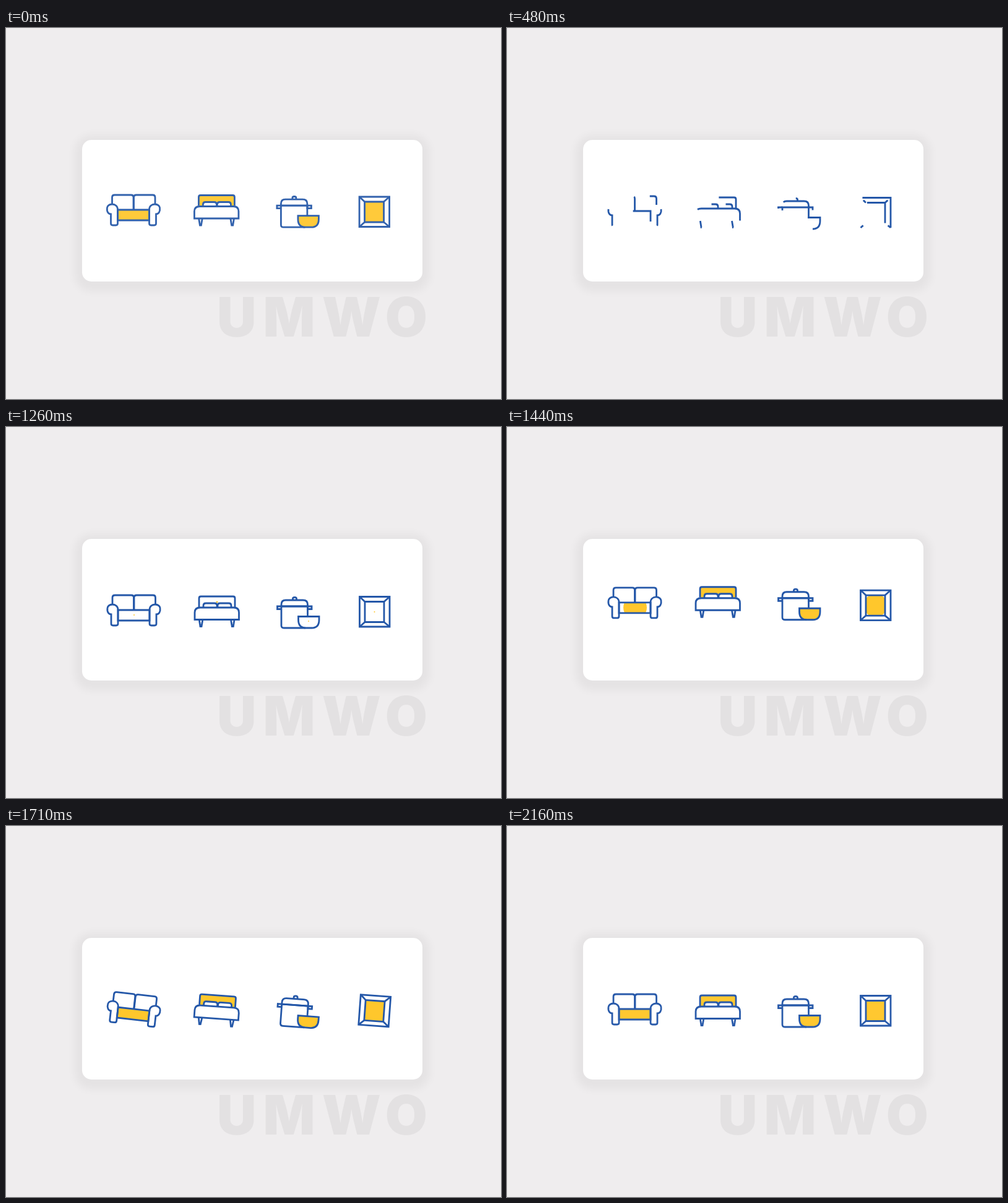
An HTML page for the animation above (2190 ms loop, 800x600 px).

```html
<!DOCTYPE html>
<html lang="en">
<head>
<meta charset="utf-8">
<title>Furniture icons</title>
<style>
  html, body { margin: 0; width: 100%; height: 100%; overflow: hidden; background: #efedee; }
  .card {
    position: absolute; left: 123px; top: 181px; width: 550px; height: 229px;
    border-radius: 15px; background: #fff;
    box-shadow: 0 4px 14px 12px rgba(0, 0, 0, .045);
  }
  svg { position: absolute; left: 0; top: 0; }
  text { font: 900 88px Inter, sans-serif; letter-spacing: 11px; fill: #e3e1e2; }
  .line { fill: none; stroke: #2457a8; stroke-width: 2.8; }
  .fill { fill: #ffc72c; }
</style>
</head>
<body>
<div class="card"></div>
<svg width="800" height="600" viewBox="0 0 800 600">
  <text x="341" y="499">UMWO</text>
</svg>
<script>
const LOOP = 2190, STEP = 30;
const svg = document.querySelector('svg');

// pivot: turning centre; spot: where the colour grows from, with its full radius;
// draw: start, end and power of the line drawing; rest: shift while fading out
const icons = [
  { pivot: [206.5, 296], spot: [207, 304, 30], draw: [305, 1258, 2],
    rest: [-.5, -2], jump: 15, tilt: 10,
    fill: 'M181 296H232V313H181Z',
    lines: [
      'M206.5 296V276Q206.5 272 202.5 272H176Q172 272 172 276V287',
      'M241.5 286V276Q241.5 272 237.5 272H211Q207 272 207 276V296',
      'M232 313V296H181V313Z',
      'M164 293C163 299 166 303 170 303V318Q170 321 173 321H178Q181 321 181 318V296C181 290 177 287 172 287C167 287 164 290 164 293',
      'M249 293C250 299 247 303 243 303V318Q243 321 240 321H235Q232 321 232 318V296C232 290 236 287 241 287C246 287 249 290 249 293'
    ] },
  { pivot: [341, 298], spot: [341, 283, 46], draw: [245, 1430, 3],
    rest: [-.6, -3.5], jump: 19, tilt: 6.4,
    fill: 'M312 274H370V291H364V288Q364 285 361 285H322Q319 285 319 288V291H312Z',
    lines: [
      'M370 291V277Q370 274 367 274H315Q312 274 312 277V291',
      'M341 292V289Q341 285 337 285H323Q319 285 319 289V292',
      'M364 292V289Q364 285 360 285H346Q342 285 342 289V292',
      'M376.5 311.5V300Q376.5 292 368 292H314Q305 292 305 300V311.5Z',
      'M312.3 312L314 322.5H316L317.8 312',
      'M363.5 312L365.3 322.5H367.3L369 312'
    ] },
  { pivot: [472, 300], spot: [489, 314, 28], draw: [245, 1430, 3],
    rest: [-.6, -2.8], jump: 16.5, tilt: 6.4,
    fill: 'M494 325Q506 325 506 312V306.5H472.5V312Q472.5 325 485 325Z',
    lines: [
      'M487.5 306V290H445V321Q445 325 449 325H484',
      'M487.5 290V287Q487.5 280 480 280H452Q445 280 445 287V290Z',
      'M445 290H438.5V294.5H445',
      'M494 294.5V290H487.5V294.5Z',
      'M469.5 280V277.5Q469.5 275.3 466.5 275.3Q463.5 275.3 463.5 277.5V280',
      'M494 325Q506 325 506 312V306.5H472.5V312Q472.5 325 485 325Z'
    ] },
  { pivot: [595.7, 299], spot: [595.5, 299, 30], draw: [245, 1430, 3],
    rest: [-.4, -1.5], jump: 13, tilt: 6.4,
    fill: 'M580 282.5H611V315.5H580Z',
    lines: [
      'M620 323V274.5H571.5V323Z',
      'M611 315.5V282.5H580V315.5Z',
      'M580 282.5L571.5 274.5',
      'M611 282.5L620 274.5',
      'M571.5 323L580 315.5',
      'M620 323L611 315.5'
    ] }
];

const clamp = x => Math.min(1, Math.max(0, x));
const span = (t, from, to) => clamp((t - from) / (to - from));

function add(parent, tag, attrs = {}) {
  const el = document.createElementNS('http://www.w3.org/2000/svg', tag);
  for (const key in attrs) el.setAttribute(key, attrs[key]);
  return parent.appendChild(el);
}

function build(icon) {
  const group = add(svg, 'g');
  const fill = add(group, 'path', { d: icon.fill, class: 'fill' });
  const lines = icon.lines.map(d => add(group, 'path', { d, class: 'line', pathLength: 1 }));
  return { group, fill, lines };
}

icons.forEach((icon, i) => {
  icon.old = build(icon);
  icon.old.group.setAttribute('transform', `translate(${icon.rest})`);
  icon.now = build(icon);
  const [cx, cy] = icon.spot;
  icon.clip = add(add(svg, 'clipPath', { id: 'spot' + i }), 'circle', { cx, cy });
  icon.now.fill.setAttribute('clip-path', `url(#spot${i})`);
});

function trim(line, p) {
  line.style.display = p > 0 ? '' : 'none';
  line.style.strokeDasharray = p > .995 ? 'none' : p + ' 2';
}

// The fade begins shortly before the loop wraps
const fade = t => 1 - clamp((t + 60) / 364) ** 1.5;

function render(t) {
  const swing = span(t, 1630, 1890);
  const wobble = Math.sin(swing * 2 * Math.PI) * (1 - swing);
  const lift = Math.sin(span(t, 1360, 1630) * Math.PI);

  for (const { old, now, clip, pivot, spot, draw, jump, tilt } of icons) {
    old.group.style.opacity = fade(t);
    now.group.style.opacity = t > LOOP - 60 ? fade(t - LOOP) : 1;

    const [start, end, power] = draw;
    const drawn = 1 - (1 - span(t, start, end)) ** power;
    now.lines.forEach(line => trim(line, drawn));
    clip.setAttribute('r', spot[2] * span(t, 1250, 1550));
    now.group.setAttribute('transform',
      `translate(0 ${-jump * lift}) rotate(${tilt * wobble} ${pivot})`);
  }
}

const begin = performance.now();
function frame() {
  const t = (performance.now() - begin) % LOOP;
  render(Math.floor(t / STEP) * STEP);
  requestAnimationFrame(frame);
}
frame();
</script>
</body>
</html>
```
